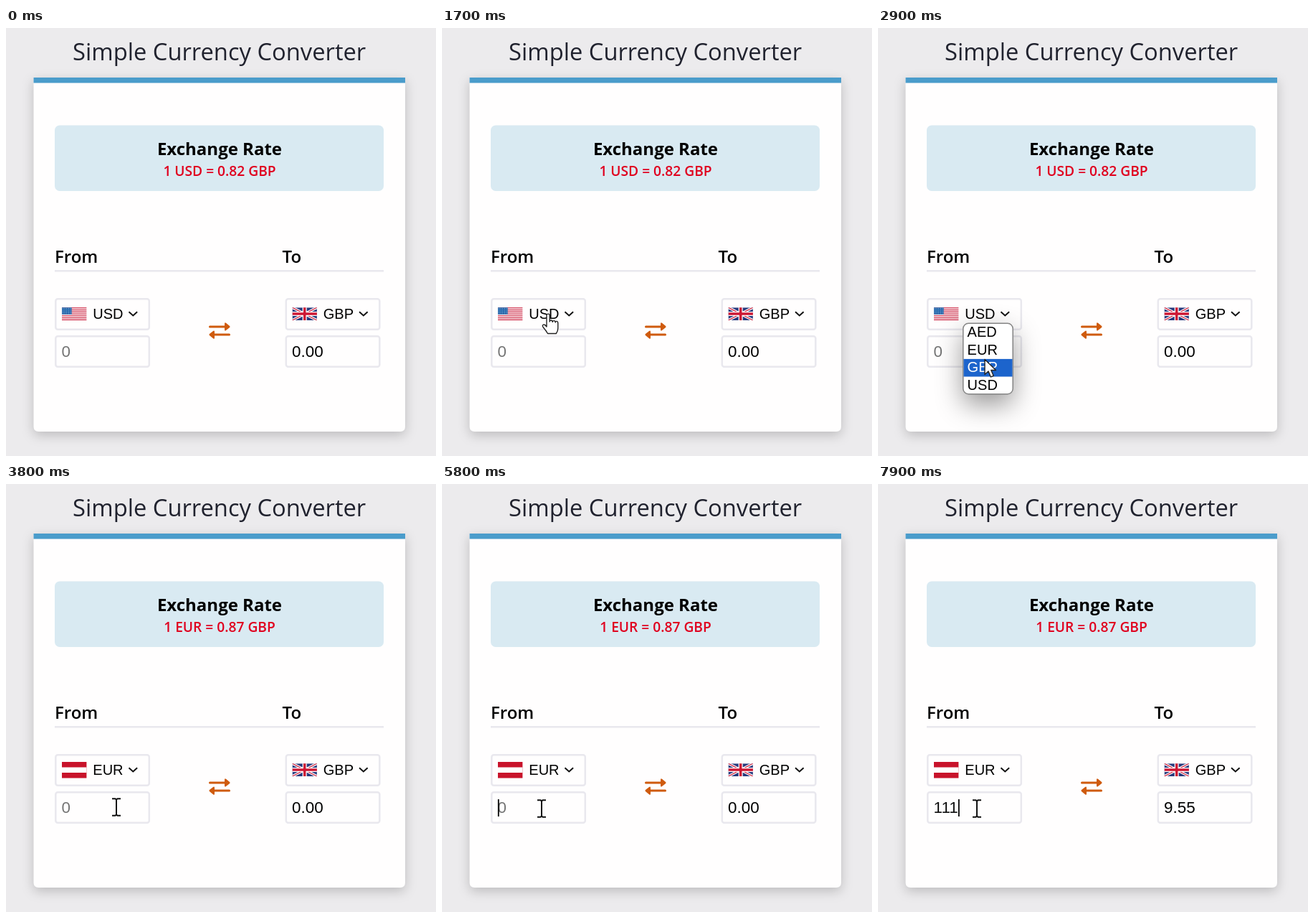
An HTML page for the animation above (8000 ms loop, 600 by 596 pixels).

```html
<!DOCTYPE html>
<html lang="en">
<head>
<meta charset="utf-8">
<title>Simple Currency Converter</title>
<style>
html, body { margin: 0; width: 100%; height: 100%; overflow: hidden; background: #ecebed; }
svg { display: block; width: 600px; height: 596px; }
text { font-family: "Open Sans", "Noto Sans", sans-serif; }
.ui { font: 20px "Liberation Sans", Arial, sans-serif; }
.num { font-size: 22.4px; }
.mid { text-anchor: middle; }
.head { font-size: 24px; font-weight: 600; }
.card { filter: drop-shadow(0 5px 8px rgba(0, 0, 0, .2)); }
.shade { filter: drop-shadow(0 14px 18px rgba(0, 0, 0, .4)); }
.box { fill: #fffefe; stroke: #e9e8ee; stroke-width: 2.5; }
.line { fill: none; stroke: #111; stroke-width: 2; }
.cursor { fill: #fff; stroke: #222; stroke-width: 1.4; stroke-linejoin: round; }
</style>
</head>
<body>
<svg viewBox="0 0 600 596">
  <defs>
    <pattern id="stars" width="2.7" height="2.4" patternUnits="userSpaceOnUse">
      <circle cx="1.35" cy="1.2" r=".5" fill="#bcd6ec"/>
    </pattern>
    <clipPath id="flagClip"><path d="M0 2.2h34.4v17.8H0z"/></clipPath>
    <g id="USD">
      <path d="M0 2.2h34.4v17.8H0z" fill="#fff"/>
      <path d="M0 2.9h34.4M0 5.64h34.4M0 8.38h34.4M0 11.12h34.4M0 13.86h34.4M0 16.6h34.4M0 19.34h34.4" stroke="#cb2340" stroke-width="1.37"/>
      <path d="M0 2.2h13.7v9.6H0z" fill="#2669ad"/>
      <path d="M0 2.2h13.7v9.6H0z" fill="url(#stars)"/>
    </g>
    <g id="EUR">
      <path d="M0 0h34.4v22.4H0z" fill="#c8132b"/>
      <path d="M0 7.5h34.4v7.4H0z" fill="#fff"/>
    </g>
    <g id="GBP" clip-path="url(#flagClip)">
      <path d="M0 2.2h34.4v17.8H0z" fill="#273a7d"/>
      <path d="M0 2.2 34.4 20M0 20 34.4 2.2" stroke="#fff" stroke-width="3.6"/>
      <path d="M0 2.2 34.4 20M0 20 34.4 2.2" stroke="#cd1734" stroke-width="1.2"/>
      <path d="M17.2 2v19M0 11.1h35" stroke="#fff" stroke-width="6"/>
      <path d="M17.2 2v19M0 11.1h35" stroke="#cd1734" stroke-width="3.5"/>
    </g>
    <path id="arrowRight" d="M-13.6-7.1H7v-2.6q0-2.4 2-1l5.1 4.3q1 .9 0 1.8L9-.4q-2 1.4-2-1v-2.5h-20.6q-1.4 0-1.4-1.6t1.4-1.6Z" fill="#cf5b0e"/>
    <g id="field">
      <rect class="box" x="69.3" y="377.3" width="130.5" height="42.5" rx="3"/>
      <rect class="box" x="69.3" y="429.3" width="130.5" height="42.5" rx="3"/>
      <path class="line" d="M171.5 395.3l5.8 5.2 5.8-5.2"/>
    </g>
  </defs>

  <rect width="600" height="596" fill="#ecebed"/>
  <text class="mid" x="297.6" y="45" font-size="32.7" fill="#20222e">Simple Currency Converter</text>
  <g class="card">
    <path d="M38.5 69H557V555q0 7-7 7H45.5q-7 0-7-7Z" fill="#fffefe"/>
  </g>
  <path d="M38.5 69H557v7.4H38.5z" fill="#4a9ccb"/>
  <rect x="68" y="135.5" width="459" height="91.5" rx="7" fill="#d9eaf2"/>
  <text class="mid" x="298" y="177" font-size="24" font-weight="700">Exchange Rate</text>
  <text class="mid" id="rate" x="298" y="206.3" font-size="19.2" font-weight="600" fill="#e0001f"></text>
  <text class="head" x="68" y="327">From</text>
  <text class="head" x="385.5" y="327">To</text>
  <path d="M68 338.2h459" stroke="#e9e8ee" stroke-width="2.6"/>

  <use href="#field"/>
  <use href="#field" x="321.5"/>
  <use id="flagFrom" x="78" y="387"/>
  <use id="flagTo" x="399.5" y="387"/>
  <text class="ui" id="from" x="121.3" y="405"></text>
  <text class="ui" id="to" x="442.8" y="405"></text>
  <text class="ui num" id="amount" x="77.6" y="458"></text>
  <text class="ui num" id="result" x="399" y="458"></text>
  <path id="caret" d="M0 439v24" stroke="#000" stroke-width="1.8"/>
  <g id="swap">
    <use href="#arrowRight"/>
    <use href="#arrowRight" transform="rotate(180)"/>
  </g>

  <g id="popup">
    <rect x="118.8" y="411.3" width="69.4" height="98.4" rx="7.5" fill="#fff" stroke="#858585" stroke-width="1.5"/>
    <rect id="hover" x="119.5" width="68" height="24.6" fill="#1c64cc"/>
    <g id="options"></g>
  </g>

  <g id="cursor">
    <path id="arrow" class="cursor" d="M0 0V21l5-4.6 3.4 8 3.8-1.6-3.4-7.8h6.7Z"/>
    <path id="hand" class="cursor" d="M-2 2.2a2.1 2.1 0 0 1 4.2 0V11q0-2 2-2t2 2.4q0-1.8 2-1.8t2 2.4q0-1.6 1.8-1.6t1.8 3V20q0 4-2.5 7.5H-.5Q-3 23-7 18.5q-1.5-2.5.5-3.3t4.5 2.8Z"/>
    <path id="beam" class="line" d="M-6-11.7h4.5l1.5 1 1.5-1H6M0-10.7V10.7M-6 11.7h4.5l1.5-1 1.5 1H6"/>
  </g>
</svg>
<script>
const LOOP = 8000, STEP = 100;
const OPEN = 2300, SHADE = 2800, PICK = 3400;
const SWAP = 4700, SWAP_BACK = 5300, FOCUS = 5700;
const ROW = 24.6, LIST_TOP = 412;
const currencies = ["AED", "EUR", "GBP", "USD"];
const rates = { USDGBP: "0.82", EURGBP: "0.87", GBPEUR: "1.15" };
const keys = [7000, 7400, 7900];
const results = ["0.00", "0.87", "9.55"];

// Cursor stops: time, x, y
const path = [
  [100, 215, 600], [1000, 178, 537], [1500, 148, 398], [2300, 148, 398],
  [2800, 149, 461.5], [3000, 149, 461.5], [3300, 150, 440], [3400, 150, 440],
  [3700, 154, 450], [4000, 154, 450], [4500, 288, 428], [4800, 288, 431],
  [5300, 288, 431], [5700, 139, 452], [7900, 138, 452]
];

const $ = id => document.getElementById(id);
const show = (id, on) => $(id).setAttribute("visibility", on ? "visible" : "hidden");
const clamp = v => Math.min(1, Math.max(0, v));
const inside = (x, y, l, t, r, b) => x >= l && x <= r && y >= t && y <= b;

const options = currencies.map((name, i) => {
  const label = document.createElementNS("http://www.w3.org/2000/svg", "text");
  label.setAttribute("class", "ui");
  label.setAttribute("x", 124.6);
  label.setAttribute("y", 430 + i * ROW);
  label.textContent = name;
  return $("options").appendChild(label);
});

function cursorAt(t) {
  const i = path.findIndex(p => p[0] > t);
  if (i < 0) return path[path.length - 1].slice(1);
  if (i === 0) return path[0].slice(1);
  const [a, b] = [path[i - 1], path[i]];
  const p = (t - a[0]) / (b[0] - a[0]), e = p * p * (3 - 2 * p);
  return [a[1] + (b[1] - a[1]) * e, a[2] + (b[2] - a[2]) * e];
}

function drawCursor(t, x, y, open) {
  let kind = "arrow";
  if (!open) {
    if (inside(x, y, 68, 376, 201, 421) || inside(x, y, 281, 408, 315, 435)) kind = "hand";
    else if (inside(x, y, 68, 428, 201, 473)) kind = "beam";
  }
  $("cursor").setAttribute("transform", `translate(${x} ${y})`);
  for (const id of ["arrow", "hand", "beam"]) show(id, t >= 100 && id === kind);
}

function drawPopup(t, y, open) {
  $("popup").style.display = open ? "" : "none";
  $("popup").setAttribute("class", t >= SHADE ? "shade" : "");
  const row = y < LIST_TOP ? 3 : Math.min(3, Math.floor((y - LIST_TOP) / ROW));
  $("hover").setAttribute("y", LIST_TOP + row * ROW - .3);
  options.forEach((o, i) => o.setAttribute("fill", i === row ? "#fff" : "#000"));
}

function drawPair(t) {
  let pair = [t < PICK ? "USD" : "EUR", "GBP"];
  if (t >= SWAP && t < SWAP_BACK) pair.reverse();
  const [from, to] = pair;
  $("rate").textContent = `1 ${from} = ${rates[from + to]} ${to}`;
  $("from").textContent = from;
  $("to").textContent = to;
  $("flagFrom").setAttribute("href", "#" + from);
  $("flagTo").setAttribute("href", "#" + to);

  const turn = start => 1 - (1 - clamp((t - start) / 400)) ** 2.5;
  const flip = Math.cos(Math.PI * (turn(SWAP) - turn(SWAP_BACK)));
  $("swap").setAttribute("transform", `translate(298 421.5) scale(${flip} 1)`);
}

function drawAmount(t) {
  const typed = keys.filter(k => t >= k).length;
  const shown = keys.filter(k => t >= k + STEP).length;
  const amount = $("amount");
  amount.textContent = "1".repeat(typed) || "0";
  amount.setAttribute("fill", typed ? "#111" : "#757575");
  $("result").textContent = results[shown];
  const last = typed ? keys[typed - 1] : FOCUS;
  show("caret", t >= FOCUS && (t - last) % 1000 < 500);
  const x = 78.8 + (typed ? amount.getComputedTextLength() : 0);
  $("caret").setAttribute("transform", `translate(${x} 0)`);
}

function draw() {
  const t = Math.floor(performance.now() % LOOP / STEP) * STEP;
  const [x, y] = cursorAt(t), open = t >= OPEN && t < PICK;
  drawPair(t);
  drawAmount(t);
  drawPopup(t, y, open);
  drawCursor(t, x, y, open);
  requestAnimationFrame(draw);
}
draw();
</script>
</body>
</html>
```
